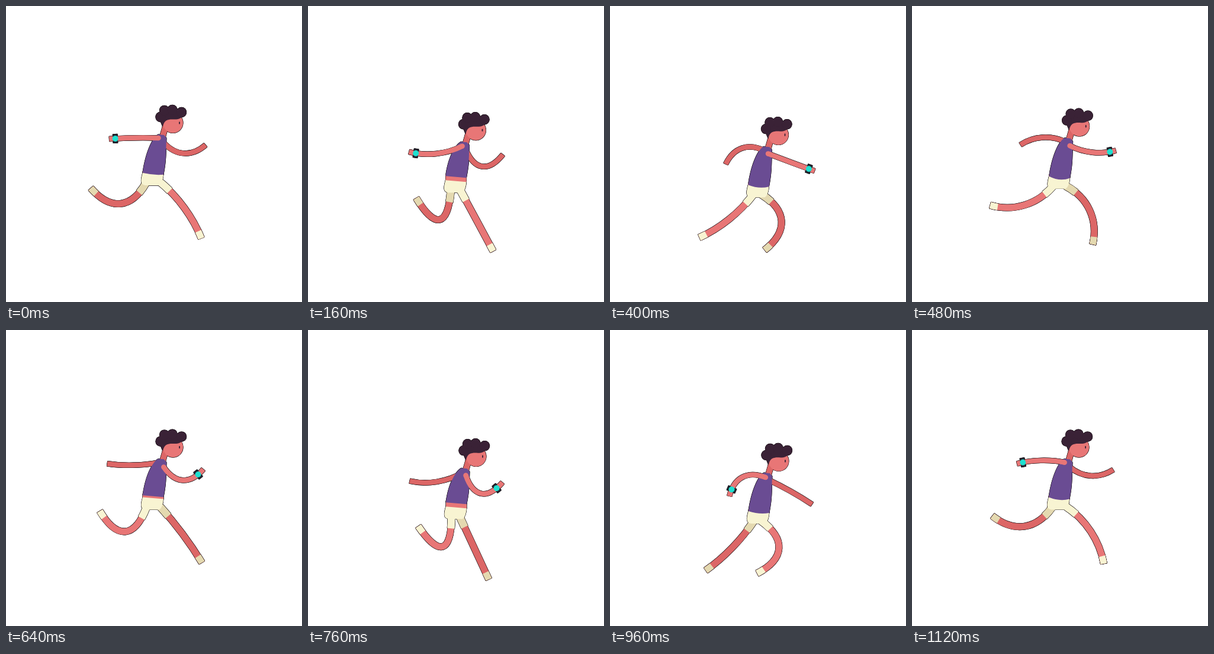
Write an HTML page with a canvas that moves like this. It is 500x500 px and loops after 1.16 s.

```html
<!DOCTYPE html>
<html lang="en">
<head>
<meta charset="utf-8">
<title>Runner</title>
<style>
  html, body { margin: 0; width: 100%; height: 100%; overflow: hidden; background: #fff; }
  canvas { display: block; width: 500px; height: 500px; }
</style>
</head>
<body>
<canvas id="stage" width="500" height="500"></canvas>
<script>
const ctx = document.getElementById('stage').getContext('2d');
const { PI, sin, cos, tanh, sqrt, max, abs } = Math;
const LOOP = 1160, HALF = LOOP / 2, STEP = 40;
const BEND = 0.62;
const LEG = 118;
const EDGE = '#140c10';
const COLORS = {
  skin: '#e87676', skinFar: '#dc6666',
  cloth: '#f8f4d2', clothFar: '#e4d9b0',
  shirt: '#6a4c93', hair: '#3a2236',
  strap: '#20242f', dial: '#1fe0d0'
};

const wave = (time, peak, period = LOOP) => cos(2 * PI * (time - peak) / period);

// A wave that lingers at both ends and rushes through the middle.
const swing = (time, peak, rush) => tanh(rush * wave(time, peak)) / tanh(rush);

// The body drops once per stride, quickly through the lowest point.
function collarAt(time) {
  const drop = abs(sin(PI * (time - 10) / HALF)) ** 3;
  return [262 + 4 * drop, 217 + 32 * drop];
}

// Root, middle and tip of a limb; angle 0 hangs down, positive points forward.
function limb(x, y, degrees, reach, bend) {
  const a = degrees * PI / 180, dx = sin(a), dy = cos(a);
  return hose(
    x, y,
    x + dx * reach / 2 + dy * bend, y + dy * reach / 2 - dx * bend,
    x + dx * reach, y + dy * reach
  );
}

function armAt(time) {
  const [x, y] = collarAt(time);
  const back = wave(time, 0), open = wave(time, 205);
  return limb(
    x - 4.5 * back, y + 10 - 4 * back,
    -1 - 88 * swing(time, 18, 2.2),
    77 + 14 * open,
    17 * open - 8.5
  );
}

function legAt(time) {
  const [, y] = collarAt(time);
  const fold = cos(PI * (time - 200) / LOOP) ** 6;
  const reach = LEG - 60 * fold;
  return limb(
    249 - 12 * wave(time, 0), y + 81,
    -24 - 61 * swing(time, 40, 0.9),
    reach,
    0.44 * sqrt(LEG * LEG - reach * reach)
  );
}

// Cubic control points of a curve running through its middle point.
function hose(x0, y0, mx, my, x3, y3) {
  const knee = (a, m, b) => (m - (0.5 - 0.375 * BEND) * (a + b)) / (0.75 * BEND);
  const kx = knee(x0, mx, x3), ky = knee(y0, my, y3);
  const mix = (a, b) => a + (b - a) * BEND;
  return [x0, y0, mix(x0, kx), mix(y0, ky), mix(x3, kx), mix(y3, ky), x3, y3];
}

const flip = p => [p[6], p[7], p[4], p[5], p[2], p[3], p[0], p[1]];

function pointOn(p, t) {
  const w = 1 - t;
  const axis = i => w * w * w * p[i] + 3 * w * w * t * p[i + 2]
    + 3 * w * t * t * p[i + 4] + t * t * t * p[i + 6];
  return [axis(0), axis(1)];
}

let ink = null;   // overrides every colour during the outline passes

function strip(p, width, color, length) {
  ctx.beginPath();
  ctx.moveTo(p[0], p[1]);
  ctx.bezierCurveTo(...p.slice(2));
  ctx.setLineDash(length ? [length, 999] : []);
  ctx.lineWidth = width;
  ctx.strokeStyle = ink || color;
  ctx.stroke();
  ctx.setLineDash([]);
}

function fill(color, path) {
  ctx.beginPath();
  path();
  ctx.fillStyle = ink || color;
  ctx.fill();
}

const disc = (x, y, r, color) => fill(color, () => ctx.arc(x, y, r, 0, 2 * PI));

function drawLeg(p, skin, cloth) {
  strip(p, 11, skin);
  strip(p, 12.5, cloth, 21);
  strip(flip(p), 11, cloth, 13);
}

function drawArm(p, skin) {
  strip(p, 8.5, skin);
  disc(p[0], p[1], 4.25, skin);
}

function drawWatch(p) {
  const [x, y] = pointOn(p, 0.87);
  const [ax, ay] = pointOn(p, 0.84), [bx, by] = pointOn(p, 0.9);
  ctx.save();
  ctx.translate(x, y);
  ctx.rotate(Math.atan2(by - ay, bx - ax));
  fill(COLORS.strap, () => ctx.rect(-4, -7.5, 8, 15));
  disc(0, 0, 5, COLORS.dial);
  ctx.restore();
}

// Torso parts are drawn relative to the collar.
function drawShorts(lift) {
  fill(COLORS.cloth, () => {
    ctx.moveTo(-31, 64);
    ctx.bezierCurveTo(-34, 76, -37, 86, -24, 86);
    ctx.lineTo(-3, 86);
    ctx.quadraticCurveTo(3, 82, 4, 67);
  });
  fill(COLORS.skin, () => {
    ctx.moveTo(-31, 62 - lift);
    ctx.lineTo(4, 65 - lift);
    ctx.lineTo(4, 68);
    ctx.lineTo(-31, 65);
  });
}

function drawShirt(lift, sag) {
  const left = 65 - lift, right = 68 - lift;
  fill(COLORS.shirt, () => {
    ctx.moveTo(-5, 0);
    ctx.bezierCurveTo(-16, 6, -27, left - 30, -31, left);
    ctx.quadraticCurveTo(-13, (left + right) / 2 + sag * 2, 4, right);
    ctx.bezierCurveTo(9, right - 25, 8, 30, 9, 6);
    ctx.lineTo(5, 1);
  });
}

function drawHead() {
  disc(0, 0, 17, COLORS.skin);
  fill(COLORS.hair, () => {
    ctx.moveTo(-17, 7);
    ctx.bezierCurveTo(-15, -8, -4, -6, 3, -6);
    ctx.bezierCurveTo(10, -6, 14, -8, 17, -12);
    ctx.lineTo(14, -21);
    ctx.lineTo(-1, -26);
    ctx.lineTo(-15, -25);
    ctx.lineTo(-24, -10);
  });
  for (const [x, y] of [[-21, -10], [-14.5, -21], [-1, -22], [14.5, -18]]) {
    disc(x, y, 8.2, COLORS.hair);
  }
  fill(COLORS.hair, () => ctx.ellipse(11, 0, 1, 2.3, 0, 0, 2 * PI));
}

function drawBody(time) {
  const flap = wave(time, 180, HALF);
  const lift = max(0, 2 + 5 * flap), sag = max(0, -4 * flap);
  ctx.save();
  ctx.translate(...collarAt(time));
  drawShorts(lift);
  strip([2, 6, 3, 0, 7.5, -11, 8.5, -19.5], 10, COLORS.skinFar);
  drawShirt(lift, sag);
  ctx.translate(20, -19.5);
  drawHead();
  ctx.restore();
}

function drawRunner(time) {
  const nearArm = armAt(time);
  drawArm(armAt(time + HALF), COLORS.skinFar);
  drawLeg(legAt(time), COLORS.skinFar, COLORS.clothFar);
  drawLeg(legAt(time + HALF), COLORS.skin, COLORS.cloth);
  drawBody(time);
  drawArm(nearArm, COLORS.skin);
  drawWatch(nearArm);
}

function render(now) {
  const time = Math.floor((now % LOOP) / STEP) * STEP;
  ctx.clearRect(0, 0, 500, 500);
  ink = EDGE;
  for (const [dx, dy] of [[-1, -1], [1, -1], [-1, 1], [1, 1]]) {
    ctx.setTransform(1, 0, 0, 1, dx * 0.45, dy * 0.45);
    drawRunner(time);
  }
  ink = null;
  ctx.setTransform(1, 0, 0, 1, 0, 0);
  drawRunner(time);
}

const start = performance.now();
function tick() {
  render(performance.now() - start);
  requestAnimationFrame(tick);
}
tick();
</script>
</body>
</html>
```
